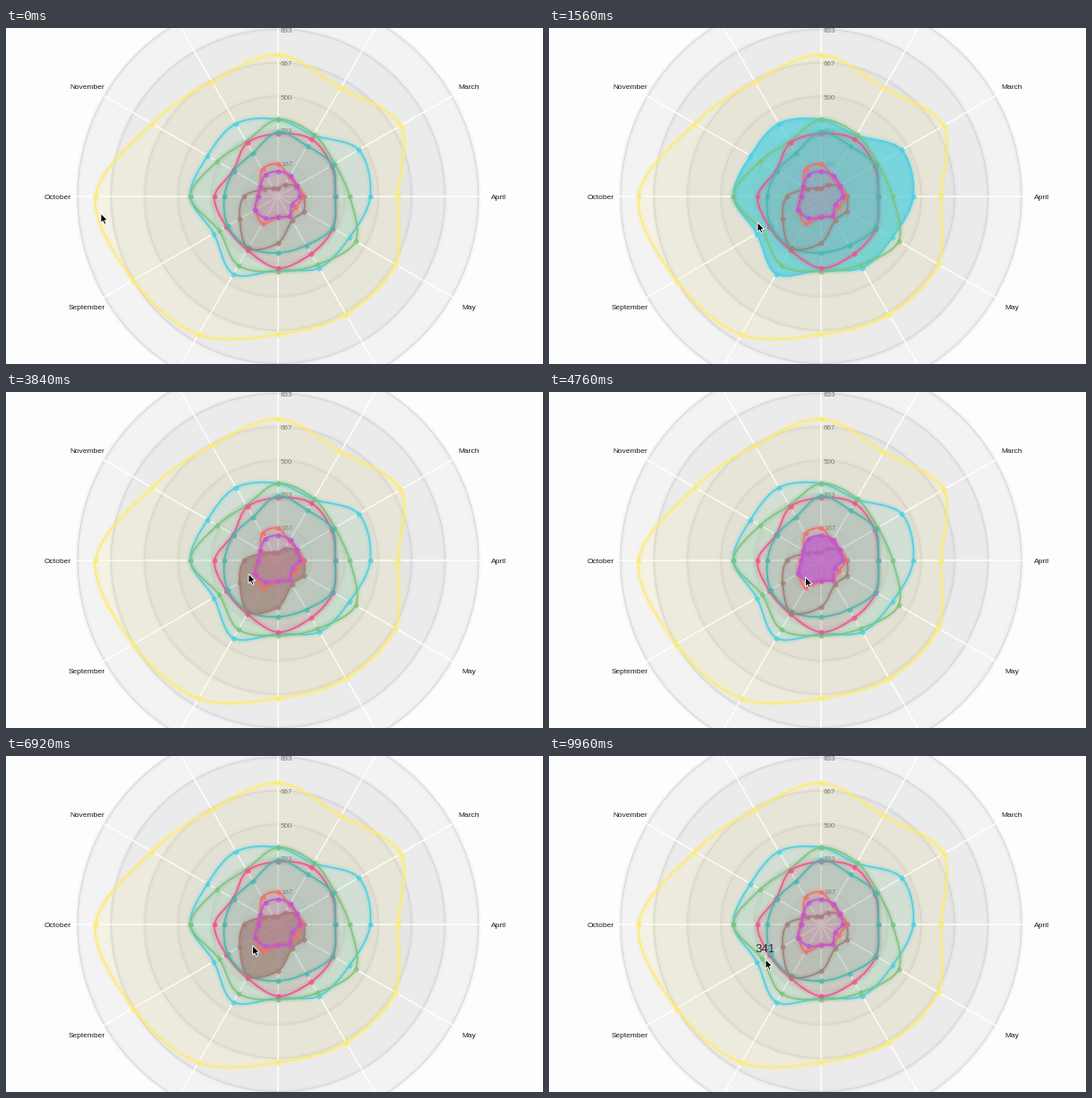
Write a matplotlib script that moves like this. It is 600x375 px and loops after 10 s.

```python
import numpy as np
import matplotlib.pyplot as plt
from matplotlib.animation import FuncAnimation
from matplotlib.patches import Circle, PathPatch, Polygon
from matplotlib.path import Path

W, H, DPI = 600, 375, 100
PT = 72 / DPI                      # points per pixel
CX, CY, R = 304, 188, 224          # R stands for the value 1000
FRAMES, STEP = 250, 40
DIM, LIT, FADE = 0.1, 0.7, 200
GLOW = [(8.5, 0.05), (6, 0.08), (3.6, 0.12)]   # width in px, alpha

# name: colour, radius in px for each month, clockwise from the top
SERIES = {
    "yellow": ("#FFEB6E", [158, 140, 158, 134, 151, 152, 154, 178, 187, 204, 163, 148]),
    "cyan": ("#4DD0E1", [86, 79, 104, 103, 92, 92, 82, 100, 83, 98, 91, 94]),
    "green": ("#7CC47F", [86, 80, 73, 80, 100, 88, 84, 89, 76.4, 98, 78.5, 71]),
    "pink": ("#F0558A", [70, 74, 69, 64, 71, 74, 80, 69, 67, 71, 58, 69]),
    "teal": ("#4DB6AC", [72, 65, 70, 64, 70, 63, 63, 66, 65, 60, 57, 56]),
    "brown": ("#A08078", [9, 15, 23, 28.5, 33, 31, 52, 67, 49.5, 38, 17, 10]),
    "red": ("#F56E6A", [36, 25, 24, 27.5, 23, 25, 23, 35, 29, 23, 23, 35]),
    "purple": ("#BE58CF", [28, 27, 24, 24, 18, 25, 23, 28, 29.5, 22, 23, 28]),
}

# start and end in ms of each highlighted area
HOVERS = [
    (60, 1180, "yellow"), (1180, 1600, "cyan"), (1600, 2520, "green"),
    (2520, 2920, "pink"), (2920, 3450, "teal"), (3450, 4180, "brown"),
    (4180, 5500, "purple"), (5960, 6700, "purple"), (6700, 7500, "brown"),
    (8180, 8420, "brown"), (8420, 8900, "teal"), (8900, 9200, "pink"),
    (9200, 9500, "green"),
]
# start, end, value, series, month
TIPS = [(7500, 8180, "221", "brown", 8), (9500, 10400, "341", "green", 8)]

# time in ms, then the tip of the pointer
MOVES = np.array([
    (0, 106, 207), (1180, 212, 214), (1560, 233, 217), (2520, 241, 209),
    (2800, 244, 206), (3450, 261, 203.5), (3840, 271, 203), (4180, 279, 204),
    (5500, 296, 210), (5840, 297, 210), (6700, 280, 211), (7500, 264, 213),
    (8100, 264, 213), (8500, 258, 217), (9500, 242, 227), (10000, 242, 227),
])
ARROW = np.array([(0, 0), (0, 10.6), (2.4, 8.4), (4.1, 12.2), (5.9, 11.4),
                  (4.3, 7.7), (7.6, 7.5)])


def polar(month, radius):
    a = np.pi / 6 * np.asarray(month)
    return np.stack([CX + radius * np.sin(a), CY - radius * np.cos(a)], axis=-1)


def smooth_loop(p):
    """Closed cardinal spline through the points."""
    tangent = (np.roll(p, -1, 0) - np.roll(p, 1, 0)) / 6
    nxt = np.roll(p, -1, 0)
    parts = np.stack([p + tangent, nxt - np.roll(tangent, -1, 0), nxt], axis=1)
    verts = np.vstack([p[:1], parts.reshape(-1, 2)])
    return Path(verts, [Path.MOVETO] + [Path.CURVE4] * (len(verts) - 1))


def ramp(t, start, end):
    """Eased fade in after start and out after end."""
    def ease(u):
        u = np.clip(u, 0, 1)
        return 4 * u ** 3 if u < 0.5 else 1 - 4 * (1 - u) ** 3
    return ease((t - start) / FADE) - ease((t - end) / FADE)


fig = plt.figure(figsize=(W / DPI, H / DPI), dpi=DPI, facecolor="#FDFDFD")
ax = fig.add_axes([0, 0, 1, 1])
ax.set_xlim(0, W)
ax.set_ylim(H, 0)
ax.axis("off")


def outline(path, color, width, z):
    for w, alpha in GLOW + [(width, 1)]:
        ax.add_patch(PathPatch(path, fill=False, ec=color, lw=w * PT,
                               alpha=alpha, zorder=z))


def label(x, y, text, size, color, z, **kw):
    return ax.text(x, y, text, fontsize=size * PT, color=color, zorder=z,
                   family="Liberation Sans", va="baseline", **kw)


def draw_grid():
    for level in range(6, 0, -1):
        r = R * level / 6
        ax.add_patch(Circle((CX, CY), r, fc="#CDCDCD", lw=0, alpha=0.19, zorder=1))
        for w, alpha in [(6, 0.07), (3.5, 0.1), (0.8, 0.9)]:
            ax.add_patch(Circle((CX, CY), r, fill=False, ec="#CDCDCD",
                                lw=w * PT, alpha=alpha, zorder=1))
    for level in range(1, 6):
        label(CX + 3, CY - R * level / 6 + 3.5, f"{1000 * level / 6:.0f}",
              8, "#737373", 2)
    for month in range(12):
        x, y = polar(month, R * 1.1)
        ax.plot([CX, x], [CY, y], color="white", lw=1.5 * PT, zorder=3)
    for month, name in [(2, "March"), (3, "April"), (4, "May"),
                        (8, "September"), (9, "October"), (10, "November")]:
        x, y = polar(month, R * 1.1)
        label(x, y + 3, name, 8.4, "#1A1A1A", 3, ha="center")


def draw_series():
    areas = {}
    for z, (name, (color, radii)) in enumerate(SERIES.items(), 4):
        points = polar(np.arange(12), np.array(radii)[:, None].ravel()[:, None].T[0])
        path = smooth_loop(points)
        areas[name] = ax.add_patch(PathPatch(path, fc=color, lw=0,
                                             alpha=DIM, zorder=z))
        outline(path, color, 1.6, z)
        ax.plot(*points.T, "o", color=color, ms=5.8 * PT, mew=0,
                alpha=0.8, zorder=z)
    return areas


def draw_tips():
    tips = []
    for _, _, text, name, month in TIPS:
        x, y = polar(month, SERIES[name][1][month])
        tips.append(label(x - 7.4, y - 7.2, text, 13.2, "#2A2A2A", 20, alpha=0))
    return tips


draw_grid()
areas = draw_series()
tips = draw_tips()
pointer = ax.add_patch(Polygon(ARROW, fc="black", ec="white", lw=0.9 * PT,
                               zorder=30))


def update(i):
    t = i * STEP
    glow = dict.fromkeys(areas, 0.0)
    for start, end, name in HOVERS:
        glow[name] += ramp(t, start, end)
    for name, area in areas.items():
        area.set_alpha(DIM + (LIT - DIM) * min(glow[name], 1))
    for tip, (start, end, *_) in zip(tips, TIPS):
        tip.set_alpha(ramp(t, start, end))
    at = [np.interp(t, MOVES[:, 0], MOVES[:, k]) for k in (1, 2)]
    pointer.set_xy(ARROW + at)
    return [*areas.values(), *tips, pointer]


anim = FuncAnimation(fig, update, frames=FRAMES, interval=STEP,
                     repeat=True, repeat_delay=0, blit=False)
plt.show()
```
